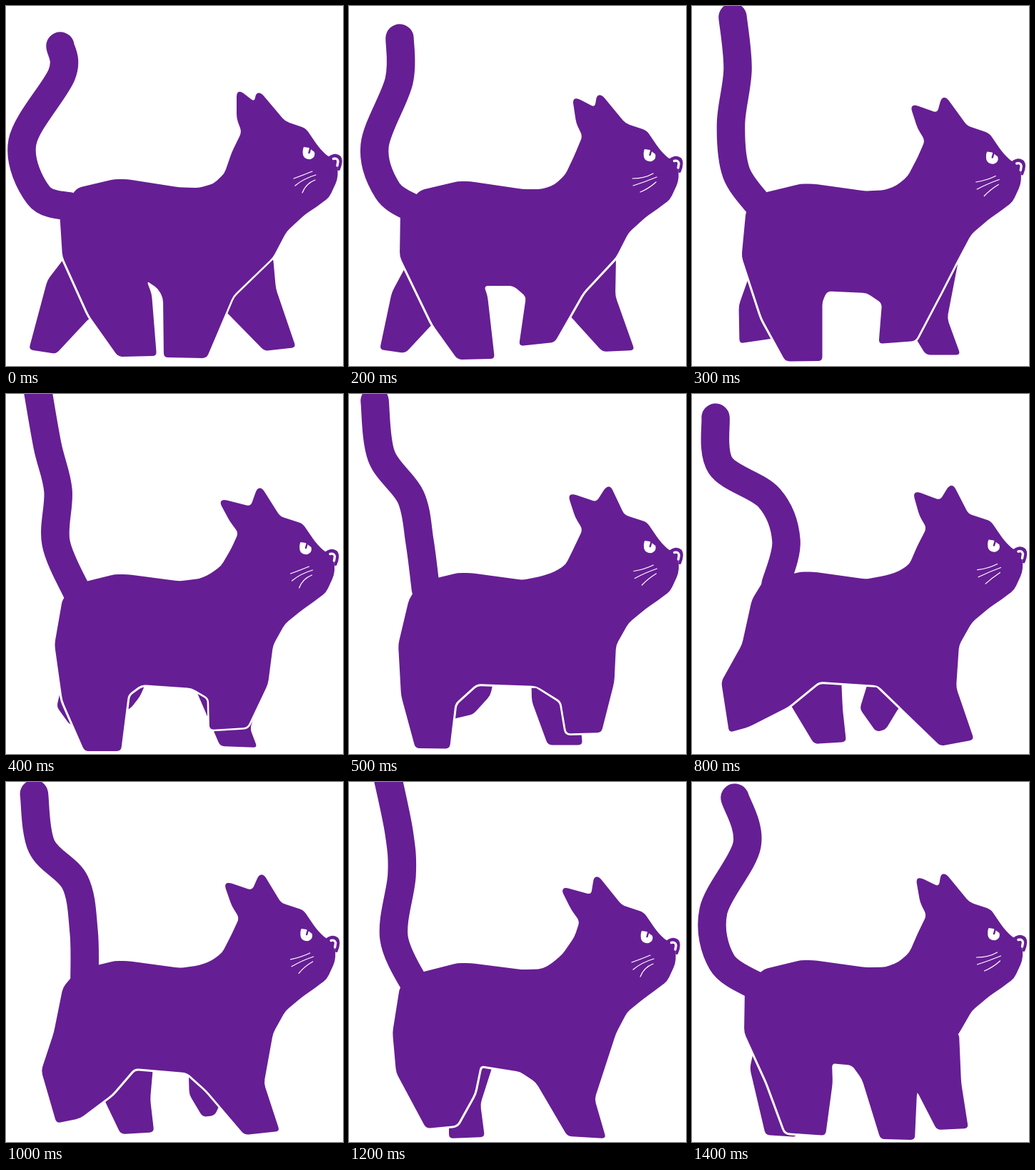
Write an HTML page with a canvas that moves like this. It is 472 by 503 pixels and loops after 1.5 s.

```html
<!DOCTYPE html>
<html lang="en">
<head>
<meta charset="utf-8">
<title>Walking cat</title>
<style>
  html, body { margin: 0; width: 100%; height: 100%; overflow: hidden; background: #fff; }
  canvas { display: block; }
</style>
</head>
<body>
<canvas id="stage" width="472" height="503"></canvas>
<script>
const ctx = document.getElementById('stage').getContext('2d');
const PURPLE = '#661e94', WHITE = '#fff';
const LOOP = 1500, STEP = 100;

const points = text => text.split(' ').map(pair => pair.split(',').map(Number));

// A pose sets the head (dx, dy, ear pulled back, forward lean, whisker droop), the gap
// around the near foreleg, the x of rump and flank, and a few joints.
// Each leg is back of knee, heel, toe, front of knee.
function pose([dx, dy, ear, lean, droop, gap, rump, flank], tail, belly, hind, fore, farHind, farFore) {
  const joints = { tail, belly, hind, fore, farHind, farFore };
  for (const name in joints) joints[name] = points(joints[name]);
  return { dx, dy, ear, lean, droop, gap, rump, flank, ...joints };
}

const poses = [
  pose([0, 0, 0, 0, 0, 5, 75, 79],
    '76,56 78,96 23,190 46,265 94,281', '197,384 213,395',
    '116,432 157,490 211,489 204,402', '220,408 221,491 281,492 318,405',
    '58,383 32,480 70,486 117,436', '309,428 362,482 406,477 378,395'),
  pose([-3, 3, .35, 0, 1, 6, 72, 71],
    '71,45 70,105 36,195 54,258 92,284', '189,391 230,391',
    '117,445 152,494 204,493 194,405', '248,406 238,475 288,470 328,400',
    '60,400 43,480 79,485 118,443', '316,440 355,483 400,481 373,405'),
  pose([-4.5, 10, 1, 6, 0, 5, 79, 68],
    '43,-14 58,72 73,135 70,208 100,278', '190,406 260,411',
    '79,428 110,499 161,499 171,420', '284,425 285,469 338,466 367,405',
    '71,437 90,463 174,440 188,422', '268,418 300,492 352,494 342,468'),
  pose([-1, 6, .35, 19, 1, 6, 89, 70],
    '29,33 33,102 100,153 128,205 115,268', '168,404 265,405',
    '67,415 76,491 121,492 126,445', '310,434 324,480 369,480 376,400',
    '131,447 133,461 174,455 208,420', '244,440 257,489 302,487 305,436'),
  pose([-1.5, 6.5, .6, 11, .6, 6, 84, 70],
    '33,33 40,100 108,145 132,205 117,266', '178,402 260,407',
    '41,402 52,473 80,465 135,437', '290,436 348,492 395,483 370,410',
    '138,434 171,489 216,486 211,440', '235,440 258,472 271,469 290,438'),
  pose([-7, 11, .95, 0, 0, 5, 71, 61],
    '52,-16 70,70 74,130 63,218 96,290', '184,396 240,405',
    '66,406 108,484 151,480 176,435', '262,420 306,495 360,498 344,443',
    '140,470 140,498 190,496 184,450', '300,430 310,460 335,460 335,440'),
  pose([-1.5, 7, .4, 0, 1, 0, 74, 73],
    '60,22 77,88 30,180 42,252 92,286', '196,393 224,396',
    '105,420 131,490 187,494 197,420', '238,415 264,499 312,500 315,434',
    '81,400 103,493 147,496 130,470', '315,432 343,486 387,484 377,420')
];

const mix = (a, b, t) => Array.isArray(a) ? a.map((v, i) => mix(v, b[i], t)) : a + (b - a) * t;

function poseAt(ms) {
  const step = Math.floor(ms / STEP);
  // The pose reached at 800 ms is held for two steps.
  const key = step < 10 ? Math.min(step, 8) / 2
    : step <= 12 ? 4 + (step - 9) / 3
    : 5 + (step - 12) / 2;
  const from = poses[Math.floor(key)], to = poses[Math.ceil(key)];
  const result = {};
  for (const part in from) result[part] = mix(from[part], to[part], key % 1);
  return result;
}

const face = points('453,267 464,243 465,230 463,221 457,213 449,209 437,196 420,171');

// From the forehead back over both ears.
const ears = ({ ear, lean }) => [
  [391 - 2 * ear - lean * .1, 161], [357 + lean, 121], [350 + lean, 122],
  [348 - 2 * ear + lean * .2, 134 + 13 * ear],
  [329 - 21 * ear, 119 + 18 * ear], [323 - 19 * ear, 121 + 21 * ear],
  [323 - 5 * ear, 157 + 11 * ear], [330, 176 + 8 * ear]
];

// From the neck to the root of the tail; it sinks along with the head.
const back = ({ dx, dy, lean }) => [
  [316, 205 + dy], [306 + dx, 234 + .6 * dy], [291 + dx, 248 + .5 * dy - .3 * lean],
  [271, 254 + .65 * dy - .4 * lean], [243, 253.5 + .8 * dy],
  [170, 242 + dy], [152, 242 + dy], [100, 254 + 1.1 * dy]
];

const chest = ({ dx, dy }) => [
  [393 + .5 * dx, 315 + .6 * dy], [418 + .8 * dx, 292 + dy], [440 + dx, 277 + dy]
];

// Path through the points with each corner cut by a small curve.
function rounded(pts, closed = true, cut = 6) {
  const path = new Path2D(), n = pts.length;
  const toward = (a, b) => mix(a, b, Math.min(.5, cut / Math.hypot(b[0] - a[0], b[1] - a[1])));
  if (!closed) path.moveTo(...pts[0]);
  for (let i = closed ? 0 : 1; i < (closed ? n : n - 1); i++) {
    const corner = pts[i];
    path.lineTo(...toward(corner, pts[(i + n - 1) % n]));
    path.quadraticCurveTo(...corner, ...toward(corner, pts[(i + 1) % n]));
  }
  if (closed) path.closePath();
  else path.lineTo(...pts[n - 1]);
  return path;
}

// Catmull-Rom curve through the points.
function spline(pts) {
  const path = new Path2D(), last = pts.length - 1;
  const at = i => pts[Math.max(0, Math.min(last, i))];
  path.moveTo(...pts[0]);
  for (let i = 0; i < last; i++) {
    const [a, b, c, d] = [at(i - 1), at(i), at(i + 1), at(i + 2)];
    path.bezierCurveTo(
      b[0] + (c[0] - a[0]) / 6, b[1] + (c[1] - a[1]) / 6,
      c[0] - (d[0] - b[0]) / 6, c[1] - (d[1] - b[1]) / 6, ...c);
  }
  return path;
}

function fill(path, color) {
  ctx.fillStyle = color;
  ctx.fill(path);
}

function stroke(path, color, width) {
  if (!width) return;
  ctx.strokeStyle = color;
  ctx.lineWidth = width;
  ctx.stroke(path);
}

function drawFace({ dx, dy, droop: d }) {
  ctx.save();
  ctx.translate(dx, dy);

  fill(new Path2D('M417 197L424 198L432 204Q434 211 427 214Q418 215 416 208Q415 201 417 197Z'), WHITE);
  stroke(new Path2D('M426.5 198L424.5 205'), PURPLE, 2.5);

  const nose = new Path2D('M453 212Q461 206 467 211Q471 216 466 228');
  fill(nose, PURPLE);
  stroke(nose, PURPLE, 4);
  stroke(new Path2D('M458.5 213.5Q464 212 465 217L464 223'), WHITE, 3.4);

  stroke(new Path2D(`M${403 - 3 * d} ${241 - 3 * d}Q417 ${236 + 2 * d} 429 231
    M${405 - 4 * d} ${251 - 3 * d}Q417 ${241 + 2 * d} 434 236
    M${415 - 4 * d} ${261 - 4 * d}Q${420 + 3 * d} ${248 + 4 * d} 433 243`), WHITE, 1.2);
  ctx.restore();
}

function draw(ms) {
  const p = poseAt(ms);
  const shoulder = [374, 351];
  const hindPart = [[p.rump, 287], [p.flank, 350], ...p.hind, ...p.belly];
  const forePart = [...p.fore, shoulder];
  const head = [...face, ...ears(p)].map(([x, y]) => [x + p.dx, y + p.dy]);

  fill(new Path2D('M0 0H472V503H0Z'), WHITE);
  fill(rounded([[95, 335], ...p.farHind, [208, 375]]), PURPLE);
  fill(rounded([[255, 375], ...p.farFore, shoulder]), PURPLE);

  // White rims part the near legs from the far ones.
  stroke(rounded(hindPart, false), WHITE, 6);
  stroke(rounded([p.belly[1], ...forePart], false), WHITE, p.gap);

  fill(rounded([...back(p), ...hindPart, ...forePart, ...chest(p), ...head]), PURPLE);
  stroke(spline(p.tail), PURPLE, 39.5);
  drawFace(p);
}

ctx.lineCap = ctx.lineJoin = 'round';
const start = performance.now();
function frame() {
  draw((performance.now() - start) % LOOP);
  requestAnimationFrame(frame);
}
frame();
</script>
</body>
</html>
```
